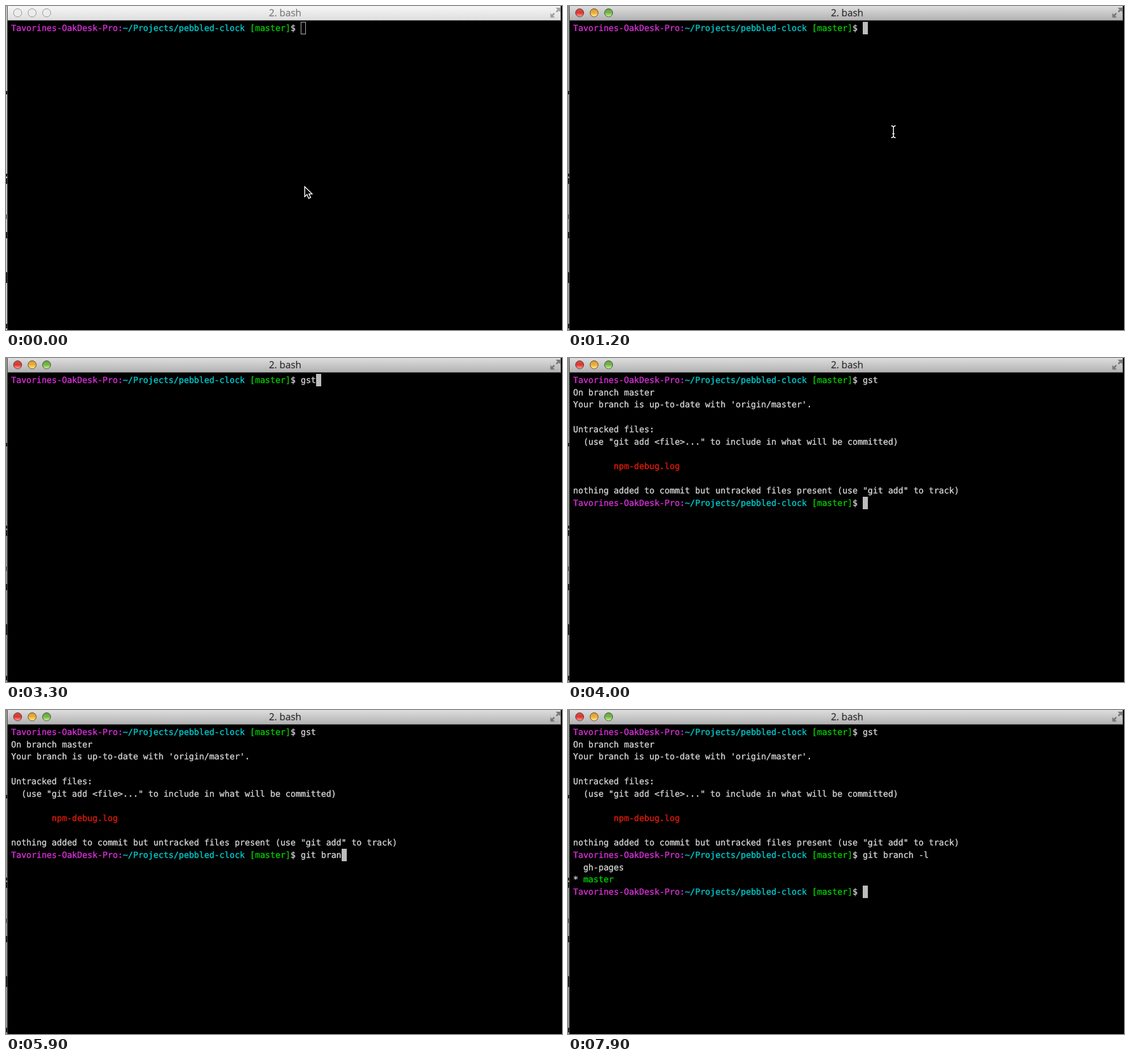
Animation, 979 px wide and 572 px high, one loop 8 s. Source, as an HTML page:

```html
<!DOCTYPE html>
<html lang="en">
<head>
<meta charset="utf-8">
<title>Terminal</title>
<style>
  html, body { margin: 0; width: 100%; height: 100%; overflow: hidden; background: #000; }
  #stage { position: relative; width: 979px; height: 572px; overflow: hidden; background: #000; }
  #stage > * { position: absolute; }

  #desk { left: 0; top: 0; width: 2px; height: 572px; overflow: hidden; background: #cbcbcb; border-right: 1px solid #484848; }
  #desk i { position: absolute; left: 0; width: 3px; background: #161616; }
  .active #desk { background: #989898; }

  #bar {
    left: 3px; top: 0; width: 973px; height: 25px;
    background: linear-gradient(#f6f6f6, #dedede);
    border-right: 1px solid #999; border-bottom: 1px solid #555;
  }
  .active #bar { background: linear-gradient(#dedede, #b2b2b2); }
  #title {
    left: 391px; top: 0; width: 201px; text-align: center;
    font: 17px/24px "Open Sans", "Noto Sans", sans-serif;
    color: #7c7c7c; text-rendering: geometricPrecision; -webkit-text-stroke: .25px;
  }
  .active #title { color: #303030; }

  svg { left: 0; top: 0; width: 979px; height: 572px; }
  .light { fill: #ececec; stroke: #929292; }
  .active .light { stroke: #0009; }
  .active .light.red { fill: url(#red); }
  .active .light.amber { fill: url(#amber); }
  .active .light.green { fill: url(#green); }
  #expand { fill: #a0a0a0; }
  .active #expand { fill: #777; }

  #text {
    left: 9px; top: 29px; margin: 0; color: #cfcfcf;
    font: 14.86px/21.7px "DejaVu Sans Mono", "Liberation Mono", monospace;
    text-rendering: geometricPrecision; font-variant-ligatures: none;
    -webkit-text-stroke: .4px;
  }
  .host { color: #d42fd2; }
  .path { color: #00c8ca; }
  .ok { color: #00c800; }
  .bad { color: #de1a0a; }

  #caret { width: 9px; height: 22px; box-sizing: border-box; border: 1px solid #bdbdbd; }
  .active #caret { background: #bdbdbd; }
  .active #arrow, #beam { display: none; }
  .active #beam { display: inline; }
</style>
</head>
<body>
<div id="stage">
  <div id="desk">
    <i style="top:150px;height:6px"></i>
    <i style="top:296px;height:5px"></i>
    <i style="top:304px;height:10px"></i>
    <i style="top:368px;height:8px;width:1px"></i>
    <i style="top:399px;height:11px;width:2px"></i>
    <i style="top:470px;height:19px"></i>
    <i style="top:561px;height:8px;width:2px"></i>
  </div>
  <div id="bar"></div>
  <div id="title">2. bash</div>
  <pre id="text"></pre>
  <div id="caret"></div>
  <svg viewBox="0 0 979 572">
    <defs>
      <linearGradient id="red" x2="0" y2="1"><stop stop-color="#c9564f"/><stop offset=".5" stop-color="#e2332e"/><stop offset="1" stop-color="#ffaaa0"/></linearGradient>
      <linearGradient id="amber" x2="0" y2="1"><stop stop-color="#d39a45"/><stop offset=".5" stop-color="#f2ad31"/><stop offset="1" stop-color="#ffef9b"/></linearGradient>
      <linearGradient id="green" x2="0" y2="1"><stop stop-color="#6d9d50"/><stop offset=".5" stop-color="#74b843"/><stop offset="1" stop-color="#d3f5a2"/></linearGradient>
    </defs>
    <circle class="light red" cx="20.5" cy="12" r="7.2"/>
    <circle class="light amber" cx="46" cy="12" r="7.2"/>
    <circle class="light green" cx="71.5" cy="12" r="7.2"/>
    <path id="expand" d="M976 3v8l-2.7-2.7-3.3 3.2-2-2 3.2-3.3-3.2-3.2zM958.500 20.500v-8l2.700 2.700 3.300-3.200 2 2-3.200 3.300 3.200 3.200z"/>
    <g id="mouse">
      <path id="arrow" d="M0 0v17.500l4-3.800 3 7 3.400-1.500-3-6.500h5.600z" fill="#000" stroke="#fff" stroke-width="1.5"/>
      <path id="beam" d="M-4-10.500q4 0 4 3.500q0-3.500 4-3.500M0-8V8M-4 10.500q4 0 4-3.500q0 3.500 4 3.500M-2 3.500h4" fill="none" stroke="#fff" stroke-width="1.6"/>
    </g>
  </svg>
</div>
<script>
const LOOP = 8000, TICK = 100;
const COL = 8.947, ROW = 21.7, PROMPT_COLS = 57;
const FOCUS_AT = 1100, HIDE_MOUSE_AT = 2900;
const $ = id => document.getElementById(id);
const span = (kind, s) => `<span class="${kind}">${s}</span>`;

const prompt = span('host', 'Tavorines-OakDesk-Pro:') +
  span('path', '~/Projects/pebbled-clock') + ' ' + span('ok', '[master]') + '$ ';

// keys: time at which each character appears; enter: time of the output
const commands = [
  { text: 'gst', keys: [2900, 3000, 3200], enter: 3500, output: [
    'On branch master',
    "Your branch is up-to-date with 'origin/master'.",
    '',
    'Untracked files:',
    '  (use "git add &lt;file&gt;..." to include in what will be committed)',
    '',
    '        ' + span('bad', 'npm-debug.log'),
    '',
    'nothing added to commit but untracked files present (use "git add" to track)'
  ] },
  { text: 'git branch -l',
    keys: [4900, 5000, 5200, 5300, 5500, 5600, 5700, 5900, 6000, 6100, 6300, 6700, 6900],
    enter: 7600, output: ['  gh-pages', '* ' + span('ok', 'master')] }
];

// time, x, y
const mousePath = [[0, 526, 319], [200, 526, 319], [1000, 573, 222], [1300, 573, 222], [2300, 620, 296]];

function mouseAt(t) {
  const i = mousePath.findIndex(p => p[0] > t);
  if (i < 0) return mousePath.at(-1).slice(1);
  const [t0, x0, y0] = mousePath[i - 1], [t1, x1, y1] = mousePath[i];
  const k = (t - t0) / (t1 - t0), e = k * k * (3 - 2 * k);
  return [x0 + (x1 - x0) * e, y0 + (y1 - y0) * e];
}

function screenAt(t) {
  const lines = [];
  let typed = '';
  for (const c of commands) {
    typed = c.text.slice(0, c.keys.filter(k => k <= t).length);
    if (t < c.enter) break;
    lines.push(prompt + c.text, ...c.output);
    typed = '';
  }
  return { html: [...lines, prompt + typed].join('\n'), row: lines.length, col: PROMPT_COLS + typed.length };
}

function draw(t) {
  const { html, row, col } = screenAt(t);
  const [x, y] = mouseAt(t);
  $('stage').className = t >= FOCUS_AT ? 'active' : '';
  $('text').innerHTML = html;
  $('caret').style.left = 9 + col * COL + 'px';
  $('caret').style.top = 28 + row * ROW + 'px';
  $('mouse').setAttribute('transform', `translate(${x} ${y})`);
  $('mouse').style.display = t < HIDE_MOUSE_AT ? '' : 'none';
}

const start = performance.now();
let shown = -1;
function frame() {
  const t = Math.floor((performance.now() - start) % LOOP / TICK) * TICK;
  if (t !== shown) draw(shown = t);
  requestAnimationFrame(frame);
}
frame();
</script>
</body>
</html>
```
